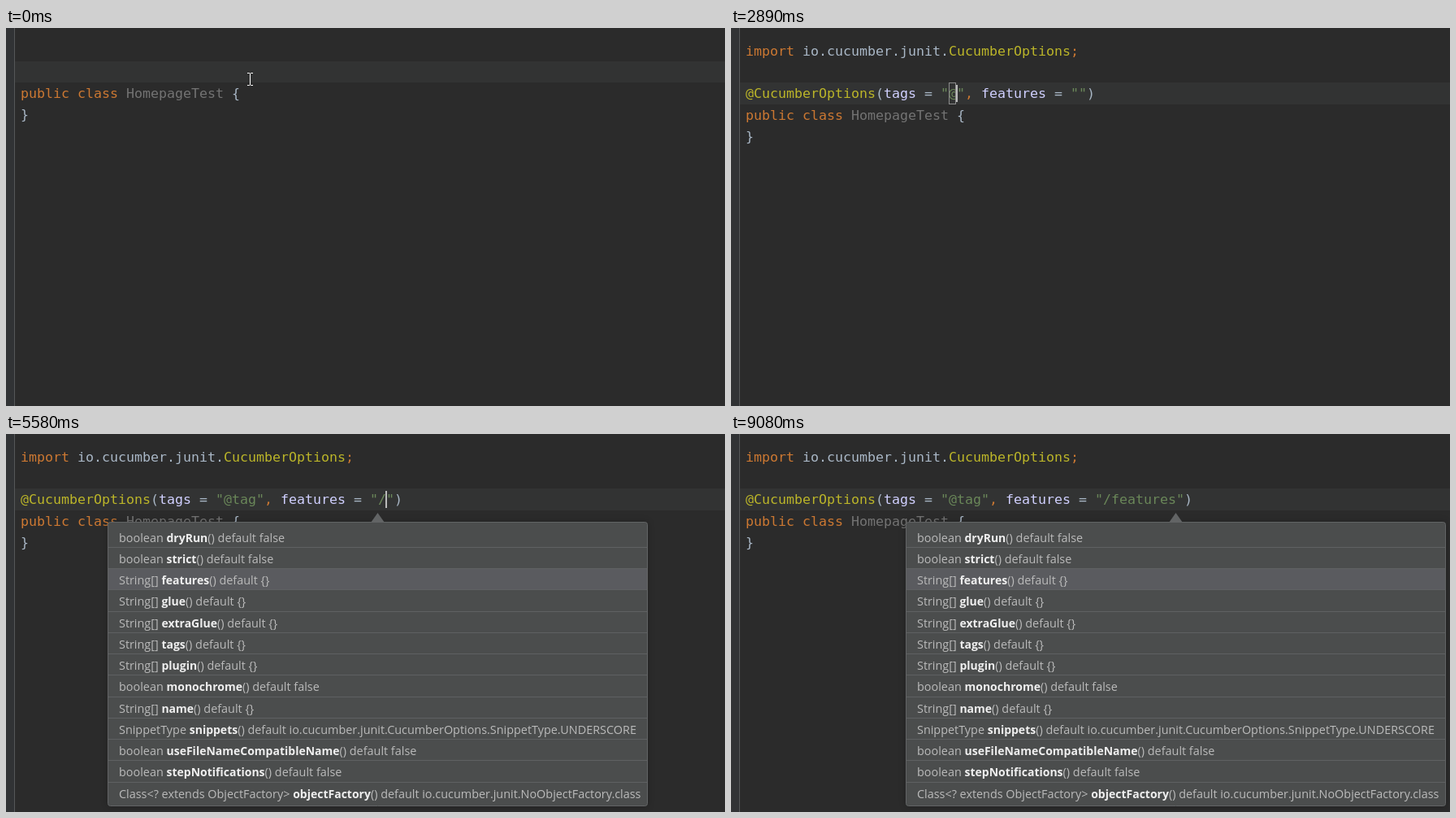
Write an HTML page with a canvas that moves like this. It is 885x465 px and loops after 9240 ms.

```html
<!DOCTYPE html>
<html lang="en">
<head>
<meta charset="utf-8">
<title>Editor completion</title>
<style>
  html, body { margin: 0; width: 100%; height: 100%; overflow: hidden; background: #2b2b2b; }
  canvas { display: block; }
</style>
</head>
<body>
<canvas width="885" height="465"></canvas>
<script>
const LOOP = 9240;
const ctx = document.querySelector('canvas').getContext('2d');

const CODE = '16.61px "DejaVu Sans Mono", monospace';
const CODE_BOLD = 'bold ' + CODE;
const HINT = '11.1px "Open Sans", sans-serif';
const INFO = '14.4px "Open Sans", sans-serif';
const INFO_BOLD = 'bold 14px "Open Sans", sans-serif';

const COLOR = {
  text: '#a9b7c6', keyword: '#cc7832', unused: '#737373', string: '#6a8759',
  annotation: '#bbb529', attribute: '#d0d0ff', popupText: '#bbbbbb',
  muted: '#8c8c8c', link: '#589df6', caret: '#bbbbbb'
};

const LEFT = 18, CHAR = 10;
const columnX = column => LEFT + column * CHAR;

// Keystroke times for each typed text
const WORD = ['cuc', [550, 690, 850]];
const TAG = ['@tag', [2890, 3190, 3330, 3420]];
const PATH = ['/features', [5580, 6120, 6200, 6280, 6360, 7450, 7530, 7600, 7920]];
const EXPANDED = 1860, COLORED = 2110, NEXT_FIELD = 4200;
const CARET_OFF = [[0, 400], [1400, EXPANDED], [5440, 5580], [9080, LOOP]];
// [time, caret column the parameter popup points to]
const INFO_STOPS = [[4340, 44], [5810, 45], [6670, 49], [7920, 52], [8160, 53]];

const METHODS = [
  ['boolean', 'dryRun', 'false'], ['boolean', 'strict', 'false'],
  ['String[]', 'features', '{}'], ['String[]', 'glue', '{}'],
  ['String[]', 'extraGlue', '{}'], ['String[]', 'tags', '{}'],
  ['String[]', 'plugin', '{}'], ['boolean', 'monochrome', 'false'],
  ['String[]', 'name', '{}'],
  ['SnippetType', 'snippets', 'io.cucumber.junit.CucumberOptions.SnippetType.UNDERSCORE'],
  ['boolean', 'useFileNameCompatibleName', 'false'],
  ['boolean', 'stepNotifications', 'false'],
  ['Class<? extends ObjectFactory>', 'objectFactory', 'io.cucumber.junit.NoObjectFactory.class']
];

const within = (t, [from, to]) => t >= from && t < to;
const typed = ([text, times], t) => text.slice(0, times.filter(at => t >= at).length);

function rect(x, y, w, h, color) {
  ctx.fillStyle = color;
  ctx.fillRect(x, y, w, h);
}

function write(text, x, y, color, font, align = 'left') {
  ctx.font = font;
  ctx.fillStyle = color;
  ctx.textAlign = align;
  ctx.fillText(text, x, y);
  return x + ctx.measureText(text).width;
}

function codeLine(y, runs) {
  let column = 0;
  for (const [text, color] of runs) {
    write(text, columnX(column), y, COLOR[color], CODE);
    column += text.length;
  }
}

function editor(lineTop, lineHeight) {
  rect(0, 0, 885, 465, '#2b2b2b');
  rect(0, 0, 10, 465, '#313335');
  rect(11, lineTop, 874, lineHeight, '#323333');
  rect(10, 0, 1, 465, '#555758');
}

function classBody(y) {
  codeLine(y, [['public class ', 'keyword'], ['HomepageTest', 'unused'], [' {', 'text']]);
  codeLine(y + 26, [['}', 'text']]);
}

function mousePointer() {
  rect(300, 56, 1, 14, '#ffffff');
  for (const y of [55, 70]) {
    rect(297, y, 3, 1, '#ffffff');
    rect(301, y, 3, 1, '#ffffff');
  }
}

function completionPopup(word, t) {
  let items = [['class', ''], ['cucumberoptions', 'Cucumber options'],
               ['const', 'Define android style int constant']];
  items = items.filter(([name]) => name.startsWith(word));
  const height = 30 + items.length * 25;
  rect(9, 66, 555, height, '#5a5d5f');
  rect(10, 67, 553, height - 2, '#46474a');
  rect(10, 67, 553, 25, '#4f5355');
  items.forEach(([name, note], i) => {
    const y = 85 + i * 25;
    const font = name === 'class' ? CODE_BOLD : CODE;
    write(word, 17, y, COLOR.link, font);
    write(name.slice(word.length), 17 + word.length * CHAR, y, COLOR.popupText, font);
    write(note, 549, y, COLOR.muted, CODE, 'right');
  });
  const footer = 66 + height - 10;
  const tip = t < 1400 ? 'Press Enter to insert, Tab to replace'
    : 'Press Ctrl+. to choose the selected (or first) suggestion and insert a dot afterwards';
  const end = write(tip, 17, footer, COLOR.muted, HINT);
  write('Next Tip', end + 5, footer, COLOR.link, HINT);
  ctx.fillStyle = '#b4b6b8';
  for (const dy of [-10, -5, 1]) {
    ctx.beginPath();
    ctx.arc(548, footer + dy - .5, 2, 0, 7);
    ctx.fill();
  }
}

function bulb() {
  ctx.fillStyle = '#edc04f';
  ctx.beginPath();
  ctx.arc(35, 56, 5.5, 0, 7);
  ctx.fill();
  rect(32, 60, 6, 2, '#edc04f');
  rect(32, 63, 6, 1, '#afb1b3');
  rect(33, 65, 4, 1, '#afb1b3');
}

function infoPopup(column) {
  const tip = columnX(column), x = tip - 333;
  const rowY = (first, i) => Math.floor(first + i * 26.25);
  ctx.beginPath();
  ctx.roundRect(x + .5, 108.5, 664, 349, 3);
  ctx.fillStyle = '#4b4d4d';
  ctx.shadowColor = 'rgba(0, 0, 0, .25)';
  ctx.shadowBlur = 8;
  ctx.fill();
  ctx.shadowColor = 'transparent';
  ctx.strokeStyle = '#626465';
  ctx.lineWidth = 1;
  ctx.stroke();
  rect(x + 1, rowY(113, 2), 663, 26, '#5a5b5f');
  ctx.beginPath();
  ctx.moveTo(tip - 9, 109);
  ctx.lineTo(tip - .5, 97);
  ctx.lineTo(tip + 8, 109);
  ctx.fillStyle = '#626465';
  ctx.fill();
  METHODS.forEach(([type, name, value], i) => {
    const y = rowY(133, i);
    if (i) rect(x + 1, rowY(113, i), 663, 1, '#5f6162');
    let end = write(type + ' ', x + 14, y, COLOR.popupText, INFO);
    end = write(name, end, y, '#eeeeee', INFO_BOLD);
    write('() default ' + value, end, y, COLOR.popupText, INFO);
  });
}

function drawTyping(t) {
  const word = typed(WORD, t);
  editor(41, 26);
  codeLine(60, [[word, 'text']]);
  classBody(86);
  if (t < 550) mousePointer();
  if (within(t, [660, 1800])) completionPopup(word, t);
  return [word.length, 44];
}

function drawTemplate(t) {
  const tag = typed(TAG, t), path = typed(PATH, t);
  const tint = color => t < COLORED ? 'text' : color;
  editor(67, 27);
  codeLine(34, [['import ', 'keyword'], ['io.cucumber.junit.', 'text'],
    ['CucumberOptions', tint('annotation')], [';', 'keyword']]);
  codeLine(86, [['@CucumberOptions', tint('annotation')], ['(', 'text'],
    ['tags', tint('attribute')], [' = ', 'text'], [`"${tag}"`, 'string'], [', ', 'keyword'],
    ['features', tint('attribute')], [' = ', 'text'], [`"${path}"`, 'string'], [')', 'text']]);
  classBody(113);

  if (t < NEXT_FIELD) {
    ctx.strokeStyle = '#8c8c8c';
    ctx.lineWidth = 1;
    ctx.strokeRect(268.5, 67.5, tag.length * CHAR - 2, 26);
  }
  if (within(t, [4980, 5580])) bulb();
  const stop = INFO_STOPS.filter(([at]) => t >= at).pop();
  if (stop) infoPopup(stop[1]);
  return [t < NEXT_FIELD ? 25 + tag.length : 44 + path.length, 70];
}

function draw(t) {
  const [column, top] = t < EXPANDED ? drawTyping(t) : drawTemplate(t);
  if (!CARET_OFF.some(span => within(t, span)))
    rect(columnX(column) - (column ? 1 : 0), top, 2, 21, COLOR.caret);
}

const start = performance.now();
function frame() {
  draw((performance.now() - start) % LOOP);
  requestAnimationFrame(frame);
}
frame();
</script>
</body>
</html>
```
